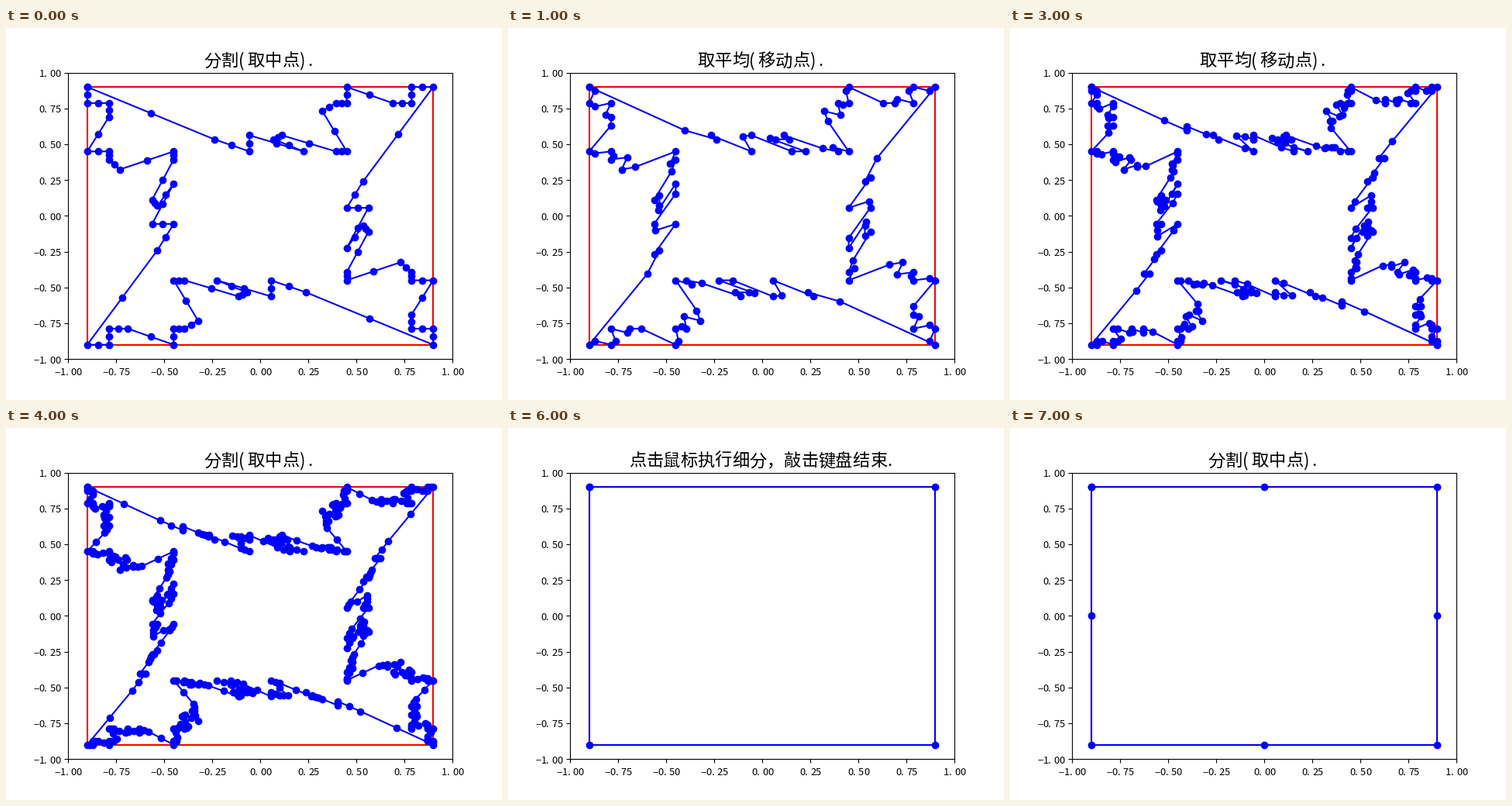
Write a matplotlib script that moves like this. It is 640x480 px and loops after 8 s.

```python
import matplotlib.pyplot as plt
import numpy as np
from matplotlib.animation import FuncAnimation

W, H, DPI = 640, 480, 100
FONT = "Noto Sans CJK JP"
SPLIT = "分割(取中点)."
MOVE = "取平均(移动点)."
PROMPT = "点击鼠标执行细分，敲击键盘结束."
SQUARE = np.array([(-0.9, 0.9), (-0.9, -0.9), (0.9, -0.9), (0.9, 0.9)])


def interleave(a, b):
    return np.stack([a, b], axis=1).reshape(-1, 2)


def split(pts):
    return interleave(pts, (pts + np.roll(pts, -1, axis=0)) / 2)


def move(pts):
    """Keep the old vertices and pull each new one towards the second next."""
    return interleave(pts, 0.75 * pts + 0.25 * np.roll(pts, -2, axis=0))


def closed(pts):
    return np.vstack([pts, pts[:1]]).T


def build_steps():
    pts = SQUARE
    for _ in range(4):
        pts = move(pts)
    steps = []
    for _ in range(3):
        steps.append((SPLIT, split(pts)))
        pts = move(pts)
        steps.append((MOVE, pts))
    return steps + [(PROMPT, SQUARE), (SPLIT, split(SQUARE))]


def cell_text(x, base, text, em_pt, size, align):
    """Lay out text in half- and full-width cells, in pixels from top left."""
    em = em_pt * DPI / 72
    cells = [em / 2 if ord(c) < 128 or c == "\u2212" else em for c in text]
    x -= align * sum(cells)
    out = []
    for char, cell in zip(text, cells):
        out.append(fig.text(x / W, 1 - base / H, char, fontsize=size,
                            family=FONT, ha="left", va="baseline"))
        x += cell
    return out


fig = plt.figure(figsize=(W / DPI, H / DPI), dpi=DPI, facecolor="white")
ax = fig.add_axes([0.125, 0.11, 0.775, 0.77])
ax.set(xlim=(-1, 1), ylim=(-1, 1))
ticks = np.linspace(-1, 1, 9)
ax.set_xticks(ticks, [""] * 9)
ax.set_yticks(ticks, [""] * 9)

for t in ticks:
    label = f"{t:.2f}".replace("-", "\u2212")
    cell_text(328 + 248 * t, 447.7, label, 10, 9.3, 0.5)
    cell_text(70.3, 242.4 - 184.8 * t + 5.3, label, 10, 9.3, 1)

ax.plot(*closed(SQUARE), "r-")
curve, = ax.plot([], [], "bo-")
titles = {s: cell_text(328, 49.3, s, 16, 16, 0.5)
          for s in (SPLIT, MOVE, PROMPT)}
steps = build_steps()


def draw(i):
    title, pts = steps[i]
    curve.set_data(*closed(pts))
    for name, chars in titles.items():
        for char in chars:
            char.set_visible(name == title)
    return [curve]


anim = FuncAnimation(fig, draw, frames=len(steps), interval=1000,
                     repeat=True, repeat_delay=0, blit=False)
plt.show()
```
